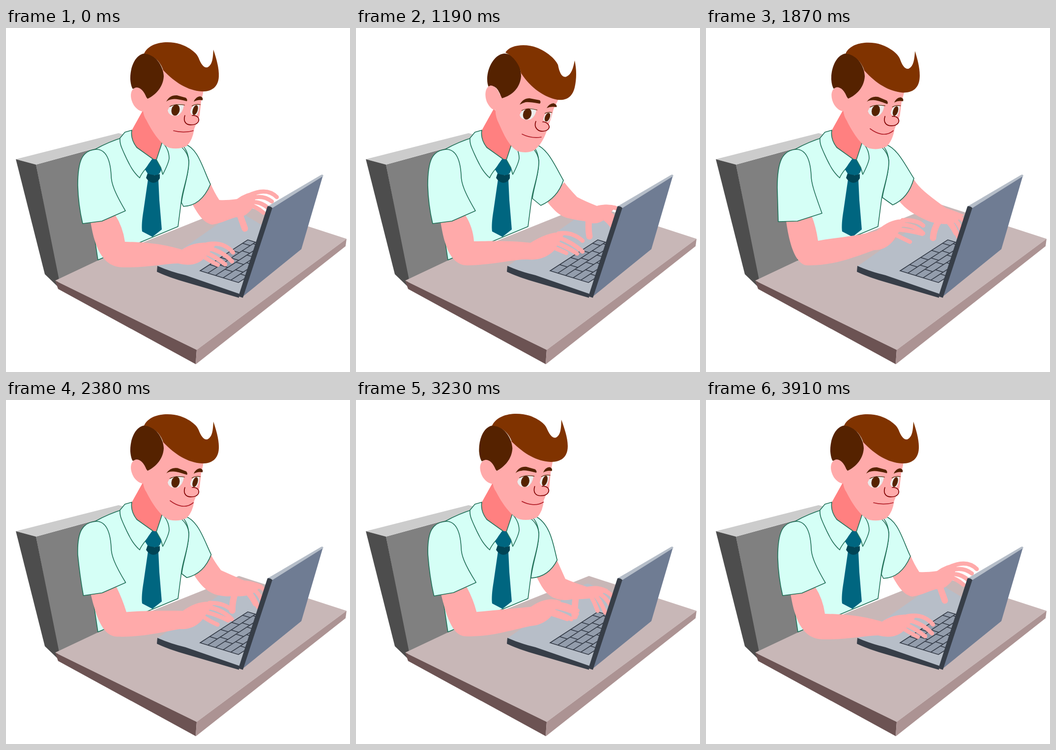
Recreate the animation shown at these times as an HTML page. Size 700x700 px, loop 4.08 s.

```html
<!DOCTYPE html>
<html lang="en">
<head>
<meta charset="utf-8">
<title>Typing at the desk</title>
<style>
  html, body { margin: 0; width: 100%; height: 100%; overflow: hidden; background: #fff; }
  svg { display: block; width: 100%; height: 100%; }
  .skin { fill: #faa; }
  .finger { fill: none; stroke: #faa; stroke-width: 8.5; stroke-linecap: round; }
  .thumb { fill: none; stroke: #faa; stroke-width: 13; stroke-linecap: round; }
  .shirt { fill: #d5fff6; stroke: #217058; stroke-width: 1.6; stroke-linejoin: round; }
  .front { fill: #803300; }
  .back, .brow, .pupil { fill: #520; }
  .white { fill: #ececec; }
  .lid { fill: none; stroke: #520; stroke-width: 1.2; }
  .nose { fill: #faa; stroke: #800000; stroke-width: 1.7; stroke-linecap: round; }
  .mouth { fill: none; stroke: #b3202a; stroke-width: 1.7; stroke-linecap: round; }
  .key { fill: none; stroke: #323945; stroke-width: 1.6; }
</style>
</head>
<body>
<svg viewBox="0 0 700 700">
  <g id="chair">
    <path fill="#808080" d="M61 278L229 232L262 222V400L187 480L107 515Z"/>
    <path fill="#ccc" d="M20 267L229 214L262 222L61 278Z"/>
    <path fill="#4d4d4d" d="M20 267L61 278L108 512L104 525L79 501Z"/>
  </g>
  <g id="desk">
    <path fill="#c8b7b7" d="M100 514L187 473L474 358L693 429L388 655Z"/>
    <path fill="#6c5353" d="M100 514L388 655L386 684L106 531Z"/>
    <path fill="#ac9393" d="M388 655L693 429L691 444L386 684.5Z"/>
  </g>
  <g id="base">
    <path fill="#b7bec8" d="M308 485L464 376Q471 371 479 376L601 450L474 545Z"/>
    <path fill="#373e48" d="M308 484Q335 496 365 503L475 541L474 549L365 517Q330 507 307 496Z"/>
    <path fill="#939dac" d="M395 494L492 431L570 455L473 518Z"/>
    <path id="keys" class="key"/>
  </g>

  <path id="farArm" class="skin"/>
  <path id="farFingers" class="finger"/>
  <path id="farThumb" class="thumb"/>
  <path id="farSleeve" class="shirt"/>

  <path class="shirt" d="M240 222Q208 232 183 246L176 398L187 472L350 404L357 350C360 325 372 300 372 272Q371 255 358 243L325 236L306 268H301L256 220Z"/>
  <path fill="#ff8080" d="M280 165L256 208Q252 228 266 243L301 269H306L320 225L300 180Z"/>
  <path class="shirt" d="M256 208L242 212L232 224Q231 234 236 245Q244 264 251 277Q259 293 272 305Q277 292 301 268L266 243Q253 226 256 208Z"/>
  <path class="shirt" d="M306 268L318 232Q332 247 332 265Q331 275 319 298L315 284Z"/>
  <path fill="#006680" d="M297 267H305L316 287Q315 294 309 299H290L283 288Q290 276 297 267ZM289 308H310L312 350L317 410L298 425L277 414Q275 400 280 370Z"/>
  <path fill="#004455" d="M288 296Q301 302 313 297L313 306Q308 315 299 315Q291 314 285 305Z"/>

  <g id="screen">
    <path fill="#6f7c93" d="M540 365L645 300L601 450L480 548Z"/>
    <path fill="#b5bdc8" d="M532 363L641 299Q645 297 646 301L541 367Z"/>
    <path fill="#373e48" d="M532 363Q537 361 542 366L482 549L473 546Z"/>
  </g>

  <path id="nearArm" class="skin"/>
  <path id="nearFingers" class="finger"/>
  <path id="nearSleeve" class="shirt"/>
  <g id="head"></g>
</svg>
<script>
const LOOP = 4080, STEP = 170;
const byId = id => document.getElementById(id);

// blend two paths of equal structure; u may leave 0..1
function blend(a, b, u) {
  const to = b.match(/-?[\d.]+/g);
  let i = 0;
  return a.replace(/-?[\d.]+/g, n => +(+n + (to[i++] - n) * u).toFixed(2));
}

// keys: [time, value], sorted by time
function span(keys, t) {
  let i = 0;
  while (i < keys.length - 2 && keys[i + 1][0] <= t) i++;
  const [t0, a] = keys[i], [t1, b] = keys[i + 1];
  return [a, b, Math.min(1, (t - t0) / (t1 - t0))];
}
function level(keys, t) {
  const [a, b, u] = span(keys, t);
  return a + (b - a) * u;
}

// keyboard: rows along the hinge, staggered key gaps
let keys = 'M395 494L492 431L570 455L473 518Z';
const spot = (r, c) => `${395 + 78 * r + 97 * c} ${494 + 24 * r - 63 * c}`;
for (let r = 0; r < 5; r++) {
  if (r) keys += `M${spot(r / 5, 0)}L${spot(r / 5, 1)}`;
  for (let c = 0.2 + (r % 2) * 0.06; c < 1; c += 0.23)
    keys += `M${spot(r / 5, c)}L${spot((r + 1) / 5, c)}`;
}
byId('keys').setAttribute('d', keys);

const nearSleeve = (side, low, mid, tip) =>
  `M183 247C156 249 ${side}Q${low}L${mid}L${tip}C220 333 214 315 214 300C212 262 200 246 183 247Z`;
const farSleeve = (curve, cuff, pit) =>
  `M366 237C${curve}Q${cuff}L${pit}C360 330 372 300 372 270Q370 250 360 240Z`;

const reach = {
  nearArm: 'M172 394C178 430 190 487 238 487C285 488 320 480 350 479Q385 488 404 468L430 438Q385 432 358 451C320 440 290 436 242 435Q238 405 222 380Z',
  nearFingers: 'M410 440Q443 434 462 457M412 448Q440 454 460 475M406 457Q428 466 446 481M398 463Q415 474 431 482',
  nearSleeve: nearSleeve('146 268 146 320', '147 360 156 398', '195 393', '243 372'),
  farArm: 'M378 356C388 375 402 398 420 400C440 397 455 388 468 385Q485 388 502 366L512 332Q488 334 470 348Q448 351 434 350Q424 335 416 316Z',
  farFingers: 'M500 338Q532 325 551 344M500 346Q523 339 541 353M498 354Q518 353 533 366M494 359Q510 364 524 376',
  farThumb: 'M474 374Q480 392 486 408',
  farSleeve: farSleeve('392 247 402 290 416 318', '397 362 361 363', '357 355')
};
const low = {
  nearArm: 'M172 394C178 430 188 481 228 481C270 480 310 462 345 441Q370 437 385 422L416 378Q388 376 352 404C310 418 270 426 240 432Q236 405 222 380Z',
  nearFingers: 'M395 388Q425 393 443 404M392 396Q420 396 443 405M385 408Q405 406 426 414M380 414Q395 411 412 412',
  nearSleeve: reach.nearSleeve,
  farArm: 'M390 350C400 365 415 372 426 384C445 400 455 400 462 402Q485 408 505 405L522 388Q500 378 480 370Q450 348 440 335Q428 322 422 312Z',
  farFingers: 'M505 386Q520 392 527 410M500 390Q512 400 520 415M490 395Q498 410 500 433M488 395Q498 408 501 425',
  farThumb: 'M465 395Q456 412 454 430',
  farSleeve: farSleeve('390 245 405 280 422 308', '411 346 378 361', '359 346')
};
const lift = {
  nearArm: 'M172 394C178 430 188 484 228 483C280 482 320 470 350 471Q380 474 402 454L426 416Q395 412 355 437C320 433 290 433 240 434Q238 405 222 380Z',
  nearFingers: 'M412 418Q440 414 461 433M412 426Q440 436 461 455M405 436Q430 446 450 459M400 446Q415 452 428 458',
  nearSleeve: reach.nearSleeve,
  farArm: 'M388 352C400 368 415 384 432 387C445 390 455 392 465 393Q490 404 508 388L530 362Q505 357 490 362Q465 352 450 344Q432 325 424 314Z',
  farFingers: 'M505 364Q525 362 540 372M500 372Q518 375 530 392M498 378Q512 382 523 397M496 382Q510 388 520 402',
  farThumb: 'M474 388Q472 408 475 424',
  farSleeve: farSleeve('390 245 405 280 422 310', '410 346 376 361', '359 347')
};
const drawn = {
  nearArm: 'M163 392C168 430 180 484 208 483C260 484 305 465 342 452Q365 452 380 434L408 391Q380 384 348 412C310 424 265 426 228 433Q224 405 215 382Z',
  nearFingers: 'M400 391Q430 390 442 402M396 400Q425 400 442 418M390 410Q415 412 440 419M384 420Q400 428 415 435',
  nearSleeve: nearSleeve('145 270 145 325', '146 360 147 394', '186 393', '236 377'),
  farArm: 'M393 352C405 368 425 380 440 387C455 395 462 396 470 397Q490 402 508 395L525 380Q505 372 488 366Q460 346 445 333Q430 320 423 308Z',
  farFingers: 'M505 381Q522 385 530 400M498 385Q512 392 520 412M492 388Q506 402 513 425M488 390Q500 402 508 418',
  farThumb: 'M474 392Q463 410 462 427',
  farSleeve: farSleeve('390 245 406 280 423 306', '412 346 380 360', '359 345')
};
const near = {
  nearArm: 'M182 398C196 440 210 478 245 480C290 482 330 480 365 480Q395 484 415 465L442 433Q405 427 372 446C335 433 300 431 262 430Q250 405 234 378Z',
  nearFingers: 'M428 435Q460 434 480 457M425 442Q455 452 477 474M420 452Q445 462 464 478M412 458Q430 473 446 479',
  nearSleeve: nearSleeve('144 264 147 305', '155 360 168 402', '205 392', '251 366'),
  farArm: 'M370 356C380 378 390 398 408 403C430 406 445 404 458 400Q480 402 500 390L520 374Q505 365 480 368Q455 365 430 360Q420 340 411 322Z',
  farFingers: 'M500 371Q522 372 530 385M496 380Q510 382 522 402M490 386Q502 395 512 417M486 386Q498 398 505 413',
  farThumb: 'M460 390Q457 410 459 430',
  farSleeve: farSleeve('395 250 402 295 412 323', '394 360 356 363', '356 362')
};
const rest = {
  nearArm: 'M169 395C175 430 188 481 210 481C260 484 310 462 350 450Q372 445 386 430L404 397Q380 384 348 408C310 420 275 426 237 432Q233 405 221 382Z',
  nearFingers: 'M390 403Q415 406 436 414M388 410Q412 409 436 416M380 416Q405 420 425 430M378 420Q400 422 422 429',
  nearSleeve: nearSleeve('145 268 146 320', '147 360 154 397', '195 392', '241 374'),
  farArm: 'M364 358C375 378 382 392 398 402C415 412 425 408 435 408Q470 408 490 405L510 392Q490 380 465 386Q440 376 424 366Q414 342 407 326Z',
  farFingers: 'M490 391Q512 398 522 412M482 396Q505 405 515 425M482 400Q496 415 505 441M472 402Q480 420 485 437',
  farThumb: 'M442 400Q438 425 438 445',
  farSleeve: farSleeve('398 255 402 300 408 327', '391 360 357 362', '356 361')
};
const armKeys = [[0, reach], [510, low], [680, low], [1190, lift], [1360, reach],
  [1870, drawn], [2040, drawn], [2720, near], [2890, near], [3400, rest],
  [3570, rest], [3910, reach], [LOOP, reach]];

// class, head raised, head bowed
const headParts = [
  ['skin',
    'M283 140C277 160 277 175 286 188C297 210 315 238 333 244Q352 248 368 240Q380 228 383 205L394 178L397 150L402 128L400 100L318 84Z',
    'M290 140C281 160 282 178 291 195C300 215 312 243 330 251Q348 256 362 249Q378 238 388 210L398 180L402 165L411 147L410 120L334 88Z'],
  ['back',
    'M281 52C262 55 252 82 253 105Q254 118 258 124Q270 118 280 134L288 144C305 136 320 120 321 98C320 74 300 50 281 52Z',
    'M301 52C282 54 267 80 267 104Q267 114 270 120Q284 114 292 132L297 143C318 137 334 122 336 98C336 70 318 51 301 52Z'],
  ['skin',
    'M265 121C252 124 251 142 260 157C267 167 275 171 283 170L292 150L286 142Q278 121 265 121Z',
    'M274 117C262 120 261 138 267 152C273 163 278 167 286 167L300 150L295 142Q288 118 274 117Z'],
  ['front',
    'M281 52C292 28 330 25 355 33C372 39 388 50 392 61C397 74 403 82 410 80C420 75 421 62 422 44C428 62 434 82 433 99C432 122 416 130 398 129C370 127 345 112 320 86C314 68 300 54 281 52Z',
    'M304 50C313 34 345 31 368 40C388 48 405 62 411 75C414 92 420 102 428 99C438 95 442 82 445 66C449 85 449 103 445 121C440 141 428 148 410 146C385 142 355 122 336 92C333 74 320 57 304 50Z'],
  ['white',
    'M329 168Q332 157 345 155Q358 153 362 157Q360 172 350 178Q332 181 329 168Z',
    'M333 177Q336 166 349 164Q362 162 367 167Q365 180 355 186Q336 189 333 177Z'],
  ['pupil',
    'M348 156A8 11 14 0 1 342 178A8 11 14 0 1 348 156Z',
    'M352 164A8 11 18 0 1 345 186A8 11 18 0 1 352 164Z'],
  ['lid', 'M333 160Q345 153 364 157', 'M337 168Q350 161 369 167'],
  ['white',
    'M375 171Q377 159 384 156L394 156Q393 169 388 177Q378 180 375 171Z',
    'M381 186Q383 175 389 172L398 172Q397 184 392 190Q383 193 381 186Z'],
  ['pupil',
    'M388 157A4.8 10 18 0 1 382 177A4.8 10 18 0 1 388 157Z',
    'M393 173A4.8 9 22 0 1 386 190A4.8 9 22 0 1 393 173Z'],
  ['lid', 'M378 159Q386 154 396 156', 'M384 174Q390 170 399 172'],
  ['brow',
    'M326 150Q333 136 348 137L366 142Q370 146 368 149Q345 143 338 145Q330 146 326 150Z',
    'M333 156Q340 143 353 143L374 147Q377 151 374 154Q352 150 345 151Q338 153 333 156Z'],
  ['brow',
    'M382 150Q386 140 395 139Q402 141 400 147Q390 145 382 150Z',
    'M388 163Q393 154 402 153Q410 156 408 161Q396 159 388 163Z'],
  ['nose',
    'M364 178C360 190 366 198 378 197C390 197 396 188 390 181Q385 177 379 178',
    'M366 190C361 202 370 211 381 210C392 209 396 202 391 196Q387 191 380 191'],
  ['mouth', 'M341 209C352 212 368 213 381 209', 'M338 216C350 222 365 224 377 222']
].map(([name, up, down]) => {
  const el = document.createElementNS('http://www.w3.org/2000/svg', 'path');
  el.setAttribute('class', name);
  byId('head').append(el);
  return { el, name, up, down };
});
const smile = 'M334 205C346 214 365 223 381 209';
const leftBrow = headParts.find(p => p.name === 'brow').el;

const bowKeys = [0, .17, .65, 1, 1.1, 1.1, 1.03, 1, .86, .65, .36, .14, 0, 0, 0, 0, 0,
  -.06, -.12, -.18, -.24, -.24, -.12, 0, 0].map((v, i) => [i * STEP, v]);
const smileKeys = [[0, 0], [1360, 0], [1870, 1], [2890, 1], [3570, 0], [LOOP, 0]];
const frownKeys = [[0, 0], [510, 1], [680, 1], [1190, 0], [1360, 0], [1870, 1],
  [2210, 1], [2720, 0], [LOOP, 0]];

function draw(t) {
  const [a, b, u] = span(armKeys, t);
  for (const id in a) byId(id).setAttribute('d', blend(a[id], b[id], u));

  const bow = level(bowKeys, t), grin = level(smileKeys, t);
  for (const { el, name, up, down } of headParts) {
    let d = blend(up, down, bow);
    if (name === 'mouth') d = blend(d, smile, grin);
    el.setAttribute('d', d);
  }
  leftBrow.setAttribute('transform', `rotate(${8 * level(frownKeys, t)} 332 152)`);
}

function tick() {
  const t = performance.now() % LOOP;
  draw(Math.floor(t / STEP) * STEP);
  requestAnimationFrame(tick);
}
tick();
</script>
</body>
</html>
```
